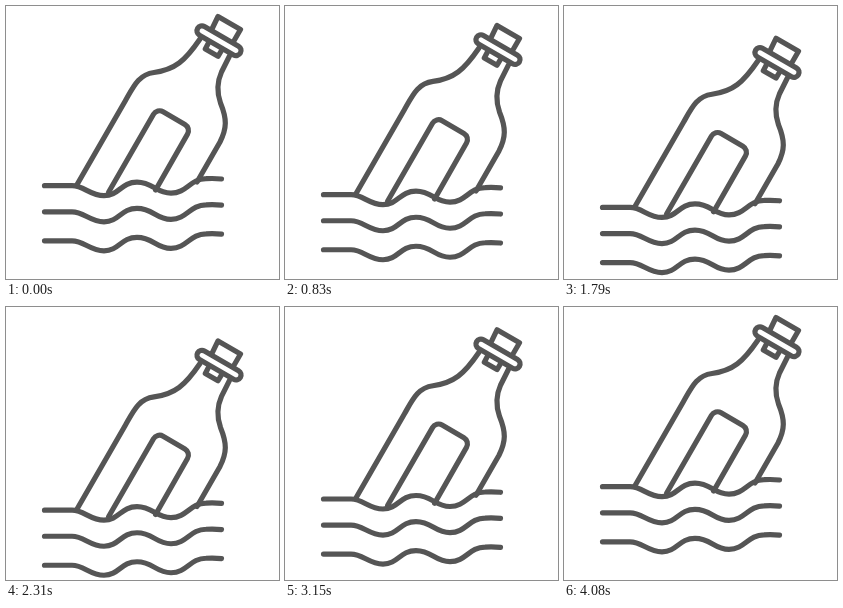
An HTML page with a canvas that plays this animation: 273 by 273 pixels, repeating every 4280 ms.

```html
<!DOCTYPE html>
<html lang="en">
<head>
<meta charset="utf-8">
<title>Bottle on the waves</title>
<style>
html, body { margin: 0; width: 100%; height: 100%; overflow: hidden; background: #fff; }
canvas { display: block; width: 100vw; height: 100vh; }
</style>
</head>
<body>
<canvas id="stage"></canvas>
<script>
const SIZE = 273, LOOP = 4280, STEPS = 43, DROP = 24;
const SINK_AT = 200, RISE_AT = 2310, TICK = 30;
const canvas = document.getElementById('stage');
const ctx = canvas.getContext('2d');

const bottle = new Path2D(
  'M70.5 179.5 L119.5 94.5 C128 79.5 133 68.5 148 66.5 C169 63.5 179 55 194 33 ' +
  'M223.5 50 L215.5 66 C211 76 211 87 214.5 97 C221 113 221 122 214 136 L191 176');
const label = new Path2D(
  'M102.7 186 L147.5 108.3 A7 7 0 0 1 157.1 105.7 L178.9 118.5 A7 7 0 0 1 181.5 128.1 L149.6 184');
const cork = new Path2D('M205.5 24 L212 10.5 L234.5 23.5 L227 36.5');
const plug = new Path2D('M204 34 L199.3 43 L212 50.3 L217 42');
const wave = new Path2D(
  'M38.5 0 H66 C78 0 84 10 98 10 C113 10 115 -3.5 131 -3.5 ' +
  'C147 -3.5 150 7.5 165 7.5 C181 7.5 184 -7 200 -7 Q208 -7.5 215.5 -6.7');

// 24 steps per second, snapped to the 30 ms tick
function steps(ms) {
  if (ms < 0) return 0;
  const n = Math.floor(ms / TICK + 1e-6);
  return Math.min(STEPS, 1 + Math.floor((n + 0.12) * 0.72));
}

function offset(t) {
  return DROP * (steps(t - SINK_AT) - steps(t - RISE_AT)) / STEPS;
}

function collar() {
  ctx.save();
  ctx.translate(213, 34.7);
  ctx.rotate(Math.PI / 6);
  ctx.beginPath();
  ctx.arc(-19.7, 0, 5, Math.PI / 2, Math.PI * 1.5);
  ctx.arc(19.7, 0, 5, -Math.PI / 2, Math.PI / 2);
  ctx.closePath();
  ctx.fill();
  ctx.stroke();
  ctx.restore();
}

function draw(t) {
  const s = canvas.width / SIZE;
  ctx.setTransform(s, 0, 0, canvas.height / SIZE, 0, 0);
  ctx.fillStyle = '#fff';
  ctx.fillRect(0, 0, SIZE, SIZE);
  ctx.translate(0, offset(t));
  ctx.strokeStyle = '#555';
  ctx.lineWidth = 5.2;
  ctx.lineCap = ctx.lineJoin = 'round';
  for (const part of [bottle, label, cork, plug]) ctx.stroke(part);
  collar();
  for (const y of [179.7, 205.8, 234.8]) {
    ctx.save();
    ctx.translate(0, y);
    ctx.stroke(wave);
    ctx.restore();
  }
}

function fit() {
  const ratio = window.devicePixelRatio || 1;
  canvas.width = Math.round(innerWidth * ratio);
  canvas.height = Math.round(innerHeight * ratio);
}

const start = performance.now();
function frame() {
  draw((performance.now() - start) % LOOP);
  requestAnimationFrame(frame);
}
addEventListener('resize', fit);
fit();
frame();
</script>
</body>
</html>
```
